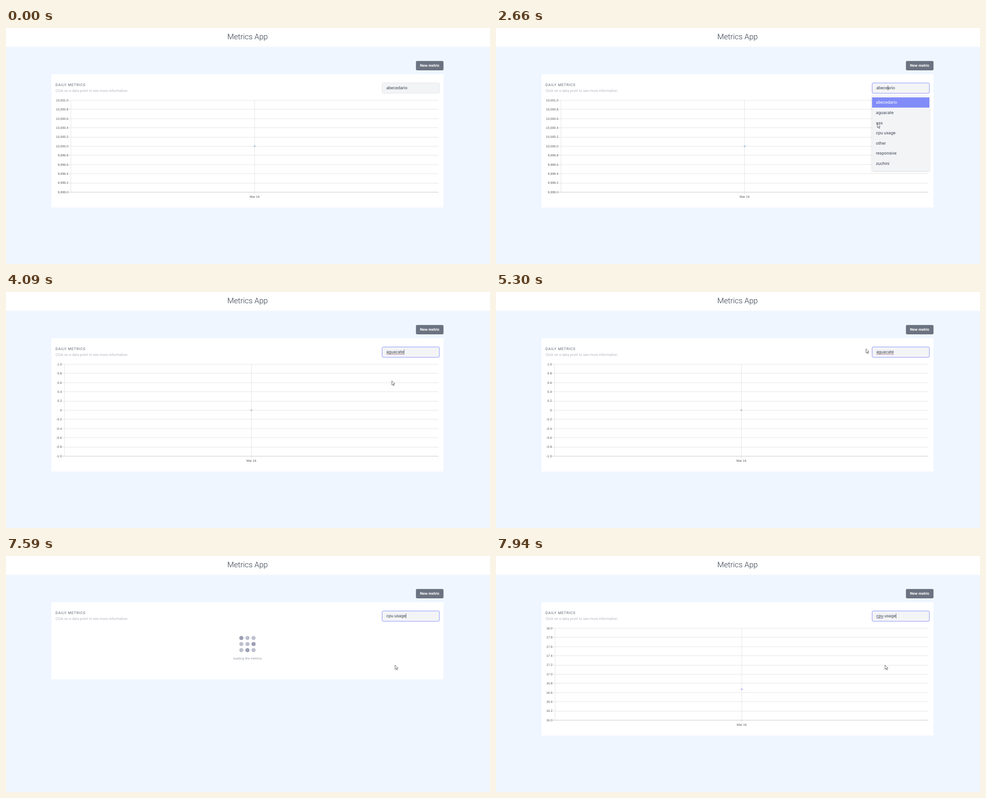
These frames come from a looping animation (1070 px wide and 524 px high, 8 s). An HTML page:

```html
<!DOCTYPE html>
<html lang="en">
<head>
<meta charset="utf-8">
<title>Metrics App</title>
<style>
html, body { margin: 0; width: 100%; height: 100%; overflow: hidden; background: #eff6ff; }
svg { display: block; font-family: Roboto, sans-serif; text-rendering: geometricPrecision; }
.off { display: none; }
.title { font-size: 17px; font-weight: 300; fill: #2f3745; }
.heading { font-size: 8px; letter-spacing: .78px; fill: #5a6170; }
.hint { font-size: 8.1px; font-weight: 300; fill: #8f96a3; }
.button { font-size: 8.4px; font-weight: 700; fill: #fff; }
.field { font-size: 9.45px; fill: #3f4756; }
.active rect { fill: #818cf8; }
.active text { fill: #fff; }
.axis text { font: 7px "Liberation Sans", Arial, sans-serif; fill: #555; }
.axis path { fill: none; stroke: #e4e4e4; }
.axis .base { stroke: #c6c6c6; }
.loading { font-size: 7.5px; font-weight: 300; fill: #6b7280; }
#menu > rect { filter: drop-shadow(0 1.5px 2px rgba(0, 0, 0, .16)); }
</style>
</head>
<body>
<svg width="1070" height="524" viewBox="0 0 1070 524">
  <rect width="1070" height="524" fill="#eff6ff"/>
  <rect width="1070" height="41.5" fill="#fff"/>
  <text class="title" x="534" y="25" text-anchor="middle">Metrics App</text>
  <rect x="906.3" y="73.3" width="60.9" height="20.7" rx="2.4" fill="#6b7280"/>
  <text class="button" x="936.7" y="86.3" text-anchor="middle">New metric</text>

  <rect id="card" x="100.5" y="102.6" width="866.7" height="296" fill="#fff"/>
  <text class="heading" x="109.5" y="129">DAILY METRICS</text>
  <text class="hint" x="109.5" y="142">Click on a data point to see more information</text>

  <g id="charts"></g>
  <g id="loader" class="off">
    <g id="dots" fill="#9ba0b4"></g>
    <text class="loading" x="533.8" y="230.4" text-anchor="middle">loading the metrics</text>
  </g>

  <rect id="input" x="831.5" y="122" width="126.6" height="23" rx="3" fill="#f3f4f6"/>
  <text id="value" class="field" x="840.7" y="136.2"></text>
  <path id="wave" fill="none" stroke-width=".9"/>
  <path id="caret" stroke="#3f4756" stroke-width=".8"/>

  <g id="menu" class="off"><rect x="831.3" y="150.3" width="126.8" height="167" rx="2.5" fill="#f3f4f6"/></g>
  <path id="cursor" d="M0 .3V9.4L2.2 7.5 3.8 11 5.2 10.4 3.7 7H6.7Z" fill="#fff" stroke="#3a3a44" stroke-width=".8"/>
</svg>
<script>
const LOOP = 8000;
const $ = id => document.getElementById(id);
const show = (el, on) => el.classList.toggle('off', !on);

// Each track lists [start time, value]; the latest started entry counts.
const texts = [[0, 'abecedario'], [2400, 'abeceario'], [3760, 'aguacate'], [5630, 'agucate'], [7430, 'cpu usage']];
const carets = [[0, -1], [1600, 5], [2130, -1], [2660, 5], [3190, -1], [3720, 5], [3760, 8], [4290, -1],
  [4770, 3], [5300, -1], [5830, 3], [6360, -1], [6890, 3], [7430, 9]];
const actives = [[0, -1], [2400, 0], [3210, 1], [3760, -1], [5630, 1], [6710, 2], [6850, 3], [6920, 4], [7250, 3], [7430, -1]];
const views = [[0, 0], [3760, 1], [7430, -1], [7730, 2]];
const waves = [[0, [0, '']], [3830, [8, '#9c5a68']], [5630, [7, '#d05050']], [7430, [0, '']], [7870, [3, '#5f5a85']]];
const path = [[370, 590, 483], [700, 690, 335], [1130, 827, 166], [1200, 834, 160], [1600, 864, 130],
  [1870, 843, 212], [3070, 843, 212], [3140, 844, 204], [3210, 846, 193], [3340, 846, 193], [3410, 848, 190],
  [3690, 855, 188], [4090, 853, 197], [4220, 853, 197], [4770, 856, 130], [5040, 818, 126], [6160, 818, 126],
  [6370, 797, 116], [6850, 857, 248], [6920, 858, 255], [7110, 858, 255], [7180, 859, 250], [7390, 860, 242]];

const at = (track, t) => track.findLast(e => e[0] <= t)[1];

function cursorAt(t) {
  const i = path.findLastIndex(p => p[0] <= t);
  const a = path[i], b = path[i + 1];
  if (!a || !b) return a && a.slice(1);
  const span = b[0] - a[0], steps = Math.max(1, Math.round(span / 69));
  const k = Math.floor((t - a[0]) / span * steps + 1e-6) / steps;
  return [a[1] + (b[1] - a[1]) * k, a[2] + (b[2] - a[2]) * k];
}

// Chart: left axis position, top value, dot height and colours.
const right = 956;
const charts = [
  { left: 143.5, top: 10001, y: 262.5, fill: '#b9d0df', line: '#adc6d7' },
  { left: 129, top: 1, y: 262.5, fill: '#e2e2e2', line: '#a8a8a8' },
  { left: 130.5, top: 18, y: 296, fill: '#dcdcfb', line: '#a3a2ee' }
];

function chartMarkup({ left, top, y, fill, line }) {
  const mid = (left + right) / 2, col = Math.floor(mid) + .5, edge = Math.floor(left) + .5;
  let out = `<path d="M${edge} 160V364M${col} 160V370"/>`;
  for (let i = 0; i <= 10; i++) {
    const v = (top * 5 - i) / 5, row = 160.5 + i * 20.4;
    const label = v ? v.toLocaleString('en-US', { minimumFractionDigits: 1 }) : '0';
    out += `<path class="${i == 10 ? 'base' : ''}" d="M${left - 5} ${Math.floor(row) + .5}H${right}"/>`
      + `<text x="${left - 5.7}" y="${row + 2.2}" text-anchor="end">${label}</text>`;
  }
  return `<g class="axis">${out}<text x="${mid}" y="376.7" text-anchor="middle">Mar 16</text>`
    + `<circle cx="${mid}" cy="${y}" r="1.8" fill="${fill}" stroke="${line}" stroke-width=".8"/></g>`;
}

$('charts').innerHTML = charts.map(chartMarkup).join('');
const chartEls = [...$('charts').children];
const risingDot = chartEls[2].querySelector('circle');

for (let i = 0; i < 9; i++) {
  $('dots').innerHTML += `<circle cx="${520.3 + i % 3 * 13.5}" cy="${182 + Math.floor(i / 3) * 13.5}" r="4.6"
    opacity="${[0, 5, 7].includes(i) ? 1 : .66}"/>`;
}

$('menu').innerHTML += ['abecedario', 'aguacate', 'ass', 'cpu usage', 'other', 'responsive', 'zuchini'].map((name, i) =>
  `<g class="item"><rect x="831.3" y="${154.1 + i * 22.6}" width="126.8" height="22.6" fill="none"/>`
  + `<text class="field" x="840" y="${168.4 + i * 22.6}">${name}</text></g>`).join('');
const items = [...document.querySelectorAll('.item')];

const value = $('value');
const textX = n => 840.7 + (n > 0 ? value.getSubStringLength(0, n) : 0);

function draw(t) {
  const text = at(texts, t);
  if (value.textContent !== text) value.textContent = text;
  $('input').setAttribute('stroke', t >= 1600 ? '#818cf8' : '#e3e5ea');

  const caret = at(carets, t);
  show($('caret'), caret >= 0);
  if (caret >= 0) $('caret').setAttribute('d', `M${textX(caret) + .4} 127.5V138.8`);

  const [count, color] = at(waves, t);
  show($('wave'), count);
  if (count) {
    $('wave').setAttribute('d', `M841 138.1H${textX(count)}`);
    $('wave').setAttribute('stroke', color);
  }

  const active = at(actives, t);
  show($('menu'), active >= 0);
  items.forEach((el, i) => el.classList.toggle('active', i === active));

  const view = at(views, t);
  chartEls.forEach((el, i) => show(el, i === view));
  show($('loader'), view < 0);
  $('card').setAttribute('height', view < 0 ? 171.4 : 296);
  const p = Math.min(1, Math.max(0, (t - 7730) / 210));
  risingDot.setAttribute('cy', 364 - 68 * p * p * (3 - 2 * p));

  const pos = cursorAt(t);
  show($('cursor'), pos);
  if (pos) $('cursor').setAttribute('transform', `translate(${pos})`);
}

const start = performance.now();
function tick() {
  draw((performance.now() - start) % LOOP);
  requestAnimationFrame(tick);
}
tick();
</script>
</body>
</html>
```
